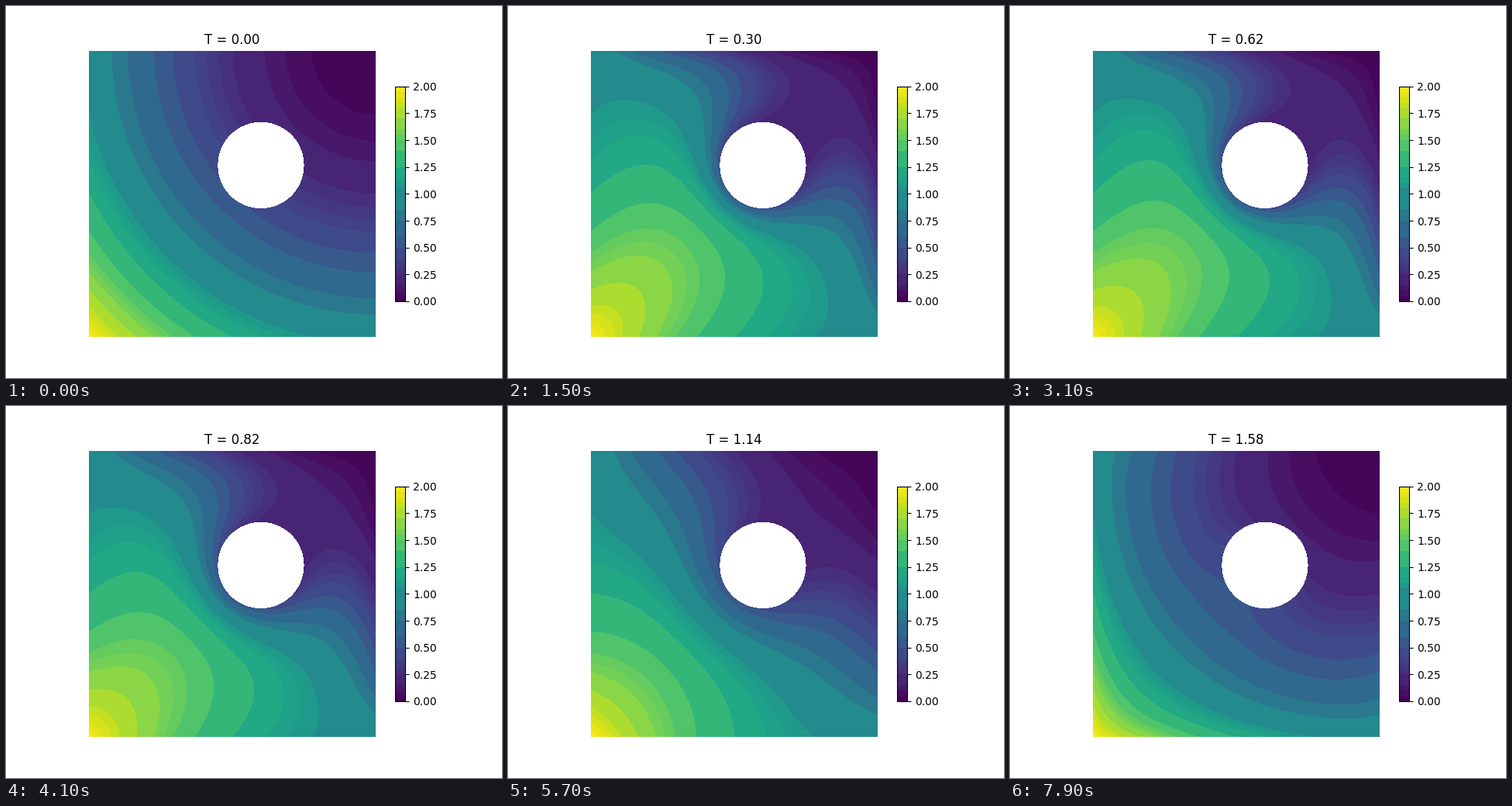
A matplotlib script for the animation above (8 s loop, 640x480 px).

```python
import numpy as np
import matplotlib.pyplot as plt
from matplotlib.animation import FuncAnimation
from matplotlib.cm import ScalarMappable
from matplotlib.colors import BoundaryNorm, ListedColormap
from matplotlib.patches import Circle

FRAMES, INTERVAL = 80, 100
DT = 0.02              # simulated time per frame
SUBSTEPS = 160
KAPPA = 0.1            # diffusivity
SPEED, OMEGA = 1.0, 1.43
CENTER, RADIUS = 0.6, 0.149
N = 128

h = 1 / N
axis = np.linspace(0, 1, N + 1)
X, Y = np.meshgrid(axis, axis)
START = (1 - X) ** 2 + (1 - Y) ** 2


def solve():
    """Advection-diffusion with an oscillating diagonal wind; all edges held."""
    free = np.hypot(X - CENTER, Y - CENTER) > RADIUS + h / 2
    free = free[1:-1, 1:-1].astype(float)
    dt = DT / SUBSTEPS
    u = START.copy()
    states = [u.copy()]
    mid = u[1:-1, 1:-1]
    left, right = u[1:-1, :-2], u[1:-1, 2:]
    down, up = u[:-2, 1:-1], u[2:, 1:-1]
    diff = KAPPA * dt / h ** 2
    for step in range((FRAMES - 1) * SUBSTEPS):
        wind = SPEED * np.cos(OMEGA * (step + 0.5) * dt) * dt / (2 * h)
        change = (diff + wind) * (left + down)
        change += (diff - wind) * (right + up)
        change -= 4 * diff * mid
        change *= free
        mid += change
        if (step + 1) % SUBSTEPS == 0:
            states.append(u.copy())
    return states


states = solve()

edges = np.array([0, 1, 2, 3, 5, 6, 7, 8, 10, 12, 15, 17, 21, 22, 23, 25,
                  28, 30, 31, 32, 34, 36, 37, 38, 39, 40]) / 20
colors = plt.get_cmap("viridis")((edges[:-1] + edges[1:]) / 4)
cmap = ListedColormap(colors)
norm = BoundaryNorm(edges, len(colors))

fig, ax = plt.subplots(figsize=(6.4, 4.8), dpi=100)
ax.set_aspect("equal")
ax.set(xlim=(0, 1), ylim=(0, 1))
ax.axis("off")
bar = fig.colorbar(ScalarMappable(norm, cmap), ax=ax, shrink=0.75,
                   spacing="proportional", ticks=np.arange(0, 2.01, 0.25),
                   format="%.2f")
bar.minorticks_off()
ax.add_patch(Circle((CENTER, CENTER), RADIUS, fc="white", ec="none",
                    antialiased=False, zorder=3))
title = ax.set_title("T = 0.00")
field = None


def draw(i):
    global field
    if field is not None:
        field.remove()
    field = ax.contourf(X, Y, states[i], levels=edges, cmap=cmap, norm=norm)
    title.set_text(f"T = {i * DT:.2f}")
    return field, title


anim = FuncAnimation(fig, draw, frames=FRAMES, interval=INTERVAL,
                     init_func=lambda: draw(0), repeat=True, repeat_delay=0)
plt.show()
```
